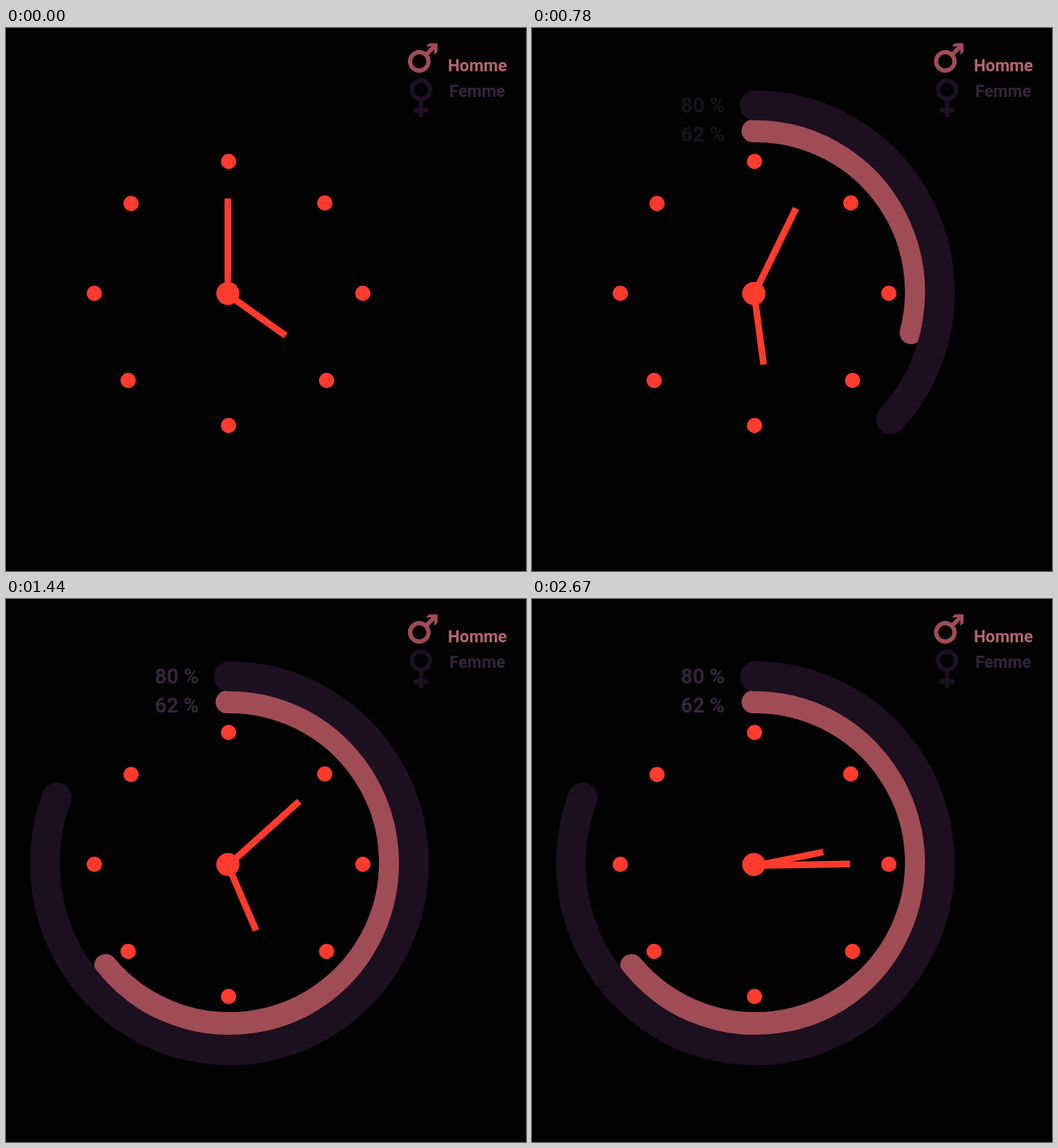
An HTML page for the animation above (2.7 s loop, 732 px wide and 765 px high).

```html
<!DOCTYPE html>
<html lang="fr">
<head>
<meta charset="utf-8">
<style>
  html, body { margin: 0; width: 100%; height: 100%; overflow: hidden; background: #020202; }
  svg { display: block; }
  text { font-family: Roboto, sans-serif; font-weight: 700; font-size: 23.5px; }
  .line { fill: none; }
  #labels { fill: #33253a; }
  #labels text { font-size: 29px; }
</style>
</head>
<body>
<svg width="732" height="765" viewBox="0 0 732 765">
  <g stroke="#a04c55" stroke-width="6" class="line">
    <circle cx="581.8" cy="47" r="13"/>
    <path d="M591 38L602 27"/>
    <path d="M591 26L595.5 21.5H607.5V33.500L603 38V30L599 26Z" fill="#a04c55" stroke="none"/>
  </g>
  <g stroke="#1c1022" stroke-width="6.3" class="line">
    <circle cx="584.2" cy="87" r="12.8"/>
    <path d="M584.3 101V125M574 116H594.500"/>
  </g>
  <text x="622" y="60.500" fill="#b5666c">Homme</text>
  <text x="624" y="97" fill="#33253a">Femme</text>

  <g class="line" stroke-linecap="round">
    <path id="men" stroke="#a04c55" stroke-width="32"/>
    <path id="women" stroke="#1c0f20" stroke-width="42"/>
  </g>
  <g id="labels">
    <text x="209.500" y="119.300">80 %</text>
    <text x="209.500" y="160.300">62 %</text>
  </g>

  <g id="dots" fill="#ff3b2d"></g>
  <g stroke="#ff3b2d" stroke-width="9.4">
    <path id="minute" d="M312.3 375.600V240.300"/>
    <path id="hour" d="M313 376V277"/>
  </g>
  <circle cx="312.3" cy="374" r="16.3" fill="#ff3b2d"/>
</svg>
<script>
  const LOOP = 2700, STEP = 30, ARC_START = 300, ARC_TIME = 1050;
  const $ = id => document.getElementById(id);

  $('dots').innerHTML = [
    [313.3, 188], [448.7, 246.5], [502.3, 373.7], [451.3, 496.5],
    [313.3, 560], [172, 496.5], [124.3, 373.7], [176, 247.3]
  ].map(([x, y]) => `<circle cx="${x}" cy="${y}" r="10.7"/>`).join('');

  // Clockwise elliptical arc; angles in degrees from twelve o'clock.
  function arc(cx, cy, rx, ry, from, sweep) {
    const point = deg => {
      const a = deg * Math.PI / 180;
      return `${cx + rx * Math.sin(a)} ${cy - ry * Math.cos(a)}`;
    };
    return `M${point(from)}A${rx} ${ry} 0 ${+(sweep > 180)} 1 ${point(from + sweep)}`;
  }

  function rotate(id, deg, x, y) {
    $(id).setAttribute('transform', `rotate(${deg} ${x} ${y})`);
  }

  function draw(t) {
    const p = Math.min(1, (t - ARC_START) / ARC_TIME);
    rotate('minute', 90 * t / LOOP, 312.3, 375.6);
    rotate('hour', 125.4 + 1408.9 * t / LOOP, 313, 376);
    $('men').setAttribute('d', p > 0 ? arc(314.5, 371.5, 226.5, 226.5, -0.9, 231.2 * p) : '');
    $('women').setAttribute('d', p > 0 ? arc(314.5, 372.4, 259.7, 263.4, -0.2, 290.8 * p) : '');
    $('labels').setAttribute('opacity', Math.max(0, p));
  }

  const start = performance.now();
  function frame() {
    const t = (performance.now() - start) % LOOP;
    draw(Math.floor(t / STEP) * STEP);
    requestAnimationFrame(frame);
  }
  frame();
</script>
</body>
</html>
```
